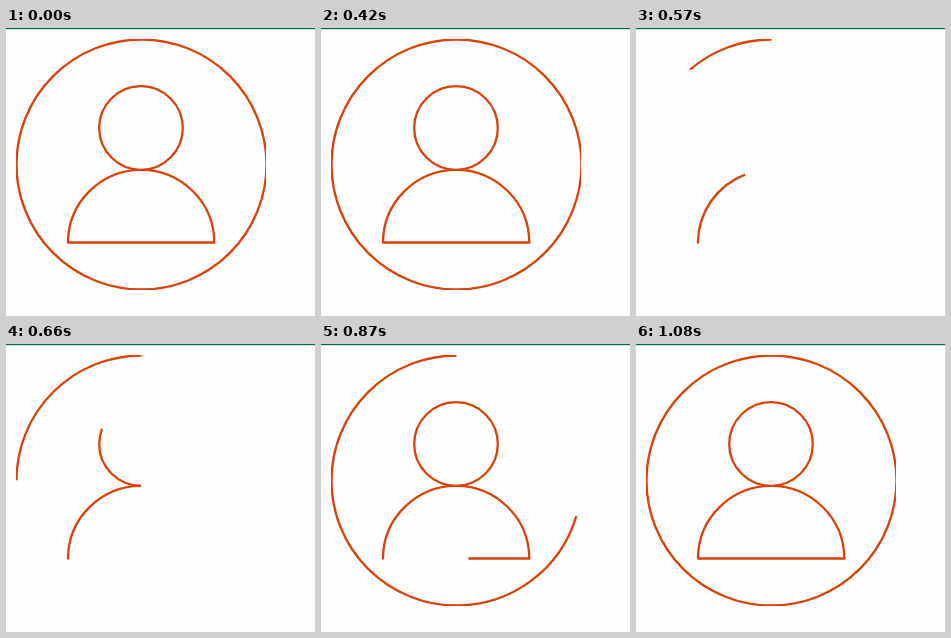
These frames come from a looping animation (309 px wide and 288 px high, 1110 ms). An HTML page:

```html
<!DOCTYPE html>
<html lang="en">
<head>
<meta charset="utf-8">
<title>Avatar outline</title>
<style>
  html, body { margin: 0; width: 100%; height: 100%; overflow: hidden; background: #fefefe; }
  svg { display: block; width: 100%; height: 100%; }
  .line { fill: none; stroke: #d9430a; stroke-width: 2.3; }
</style>
</head>
<body>
<svg viewBox="0 0 309 288">
  <clipPath id="frame"><rect x="10" y="11" width="250" height="251"/></clipPath>
  <rect width="309" height="1.2" fill="#0c6546"/>
  <g clip-path="url(#frame)">
    <path class="line" d="M135.5 11.5 A125 125 0 0 0 135.5 261.5 A125 125 0 0 0 135.5 11.5"/>
    <path class="line" d="M62 215.5 V214.5 A73.2 73 0 0 1 135 141.8
      A41.8 41.8 0 0 1 135 58.2 A41.8 41.8 0 0 1 135 141.8
      A73.2 73 0 0 1 208.3 214.5 H62"/>
  </g>
</svg>
<script>
  const LOOP = 1110, STEP = 30;
  const RESTART = 429;      // moment the outline vanishes and is drawn anew
  const DRAW_TIME = 1900;   // full easing span, longer than the visible loop
  const DASH = 1500;
  const lines = document.querySelectorAll('.line');

  const bezier = (a, b, s) => 3 * a * s * (1 - s) ** 2 + 3 * b * s * s * (1 - s) + s ** 3;

  // Same curve as the CSS "ease" keyword
  function ease(x) {
    let low = 0, high = 1;
    for (let i = 0; i < 30; i++) {
      const mid = (low + high) / 2;
      if (bezier(0.25, 0.25, mid) < x) low = mid; else high = mid;
    }
    return bezier(0.1, 1, low);
  }

  function render(time) {
    const t = Math.floor((time % LOOP) / STEP) * STEP;
    const elapsed = (t - RESTART + LOOP) % LOOP;
    const drawn = DASH * ease(elapsed / DRAW_TIME);
    for (const line of lines) line.style.strokeDasharray = `${drawn} ${2 * DASH}`;
  }

  const start = performance.now();
  function tick() {
    render(performance.now() - start);
    requestAnimationFrame(tick);
  }
  tick();
</script>
</body>
</html>
```
